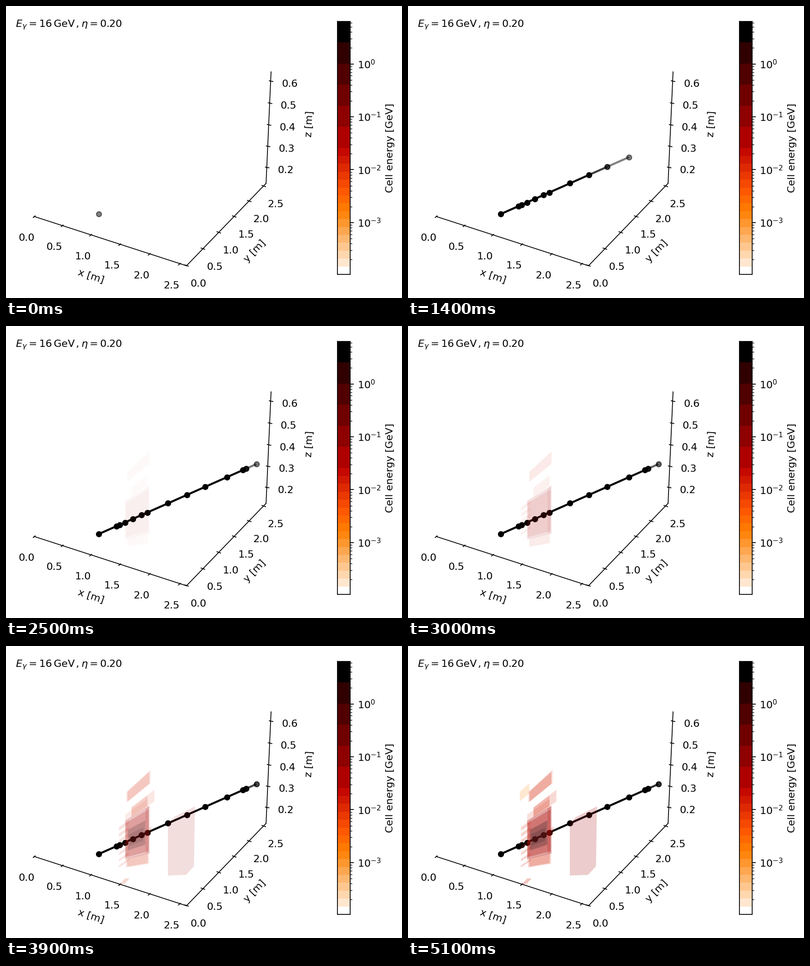
Write a matplotlib script that moves like this. It is 871 px wide and 643 px high and loops after 6.1 s.

```python
import matplotlib.pyplot as plt
import numpy as np
from matplotlib.animation import FuncAnimation
from matplotlib.patches import Polygon

W, H, DPI = 871, 643, 160
FRAMES, INTERVAL = 61, 100
TRACK_END, SHOWER_START, SHOWER_END = 20, 24, 51

plt.rcParams.update({"font.family": "DejaVu Sans", "font.size": 10})
fig = plt.figure(figsize=(W / DPI, H / DPI), dpi=DPI, facecolor="white")
ax = fig.add_axes([0, 0, 1, 1])
ax.set(xlim=(0, W), ylim=(H, 0))
ax.axis("off")


def label(x, y, text, angle):
    ax.text(x, y, text, rotation=angle, ha="center", va="center",
            rotation_mode="anchor")


def axis(start, end, first_tick, last_tick, depth, values, stroke, offset):
    """Axis line whose ticks are spaced in perspective; depth 1 is even spacing."""
    style = dict(color="black", lw=0.8)
    ax.plot(*zip(start, end), **style)
    first_tick, last_tick = np.array(first_tick), np.array(last_tick)
    for u, value in zip(np.linspace(0, 1, len(values)), values):
        x, y = first_tick + (last_tick - first_tick) * u / (u + (1 - u) * depth)
        ax.plot([x - stroke[0], x + stroke[0]], [y - stroke[1], y + stroke[1]], **style)
        ax.text(x + offset[0], y + offset[1], f"{value:.1f}", ha="center", va="baseline")


def draw_axes():
    left, corner, right, top = (62, 463.5), (397, 572), (572, 390.5), (583, 145)
    halves, tenths = np.arange(0, 3, 0.5), np.arange(2, 7) / 10
    axis(left, corner, (62, 464), (381.5, 568.5), 1.049, halves, (2.2, -1.8), (-17, 53))
    axis(corner, right, (397, 571.5), (567, 396.5), 0.93, halves, (4, 1.4), (26.2, 46.7))
    axis(right, top, (574.5, 355.5), (583, 165.5), 1.029, tenths, (4, 0.8), (40.7, 12))
    label(187, 596, "x [m]", -18)
    label(547.5, 540, "y [m]", 46.3)
    label(667.5, 259.5, "z [m]", 87.2)
    ax.text(21, 46, r"$E_\gamma = 16\,\mathrm{GeV}\,, \eta = 0.20$", va="baseline")


def heat(x):
    return tuple(np.clip([1.5 * x, 2 * x - 1, 4 * x - 3], 0, 1))


def draw_colorbar():
    cax = fig.add_axes([729.3 / W, 1 - 591 / H, 28 / W, 557 / H])
    cax.set(yscale="log", ylim=(1.05e-4, 6.35), xlim=(0, 1), xticks=[])
    cax.yaxis.tick_right()
    cax.yaxis.set_minor_formatter("")
    # coarse bands in the dark half, fine bands in the bright half
    edges = np.r_[np.linspace(0, 0.5, 7), np.linspace(0.5, 1, 17)[1:]]
    for i, (a, b) in enumerate(zip(edges[:-1], edges[1:])):
        color = "black" if i == 0 else "white" if b == 1 else heat((a + b) / 2)
        cax.fill_between([0, 1], 1 - b, 1 - a, color=color, lw=0,
                         transform=cax.transAxes, antialiased=False)
    label(845, 312.5, "Cell energy [GeV]", 90)


draw_axes()
draw_colorbar()

# Track: hits on a straight line, each with the segment leading to it.
hit_x = np.array([204.2, 243.3, 250, 261.5, 279, 298, 310.7,
                  356.3, 398, 437.7, 486.3, 521.3, 527.8, 550.5])
hit_y = 458 - 0.4441 * (hit_x - hit_x[0])
hit_births = np.floor(TRACK_END * np.linspace(0, 1, len(hit_x)) ** 1.15).astype(int)


def segment(i):
    part = slice(max(i - 1, 0), i + 1)
    line, = ax.plot(hit_x[part], hit_y[part], "o-", color="black", lw=2, ms=5, mew=1,
                    markevery=[-1], solid_capstyle="butt", zorder=3)
    return line


segments = [segment(i) for i in range(len(hit_x))]

# Shower: translucent cell faces whose edges run towards one horizon.
HORIZON, REACH = 524, 222
FLAME, DEEP, SOOT, PEACH, WINE = [tuple(np.array(c) / 255) for c in (
    (215, 40, 10), (175, 15, 10), (40, 30, 35), (255, 140, 30), (168, 18, 18))]
cells = []


def cell(birth, color, alpha, points):
    patch = ax.add_patch(Polygon(points, fc=color, lw=0, zorder=4))
    cells.append((birth, alpha, patch))


def slab(birth, color, alpha, x0, x1, top, bottom):
    def far(y):
        return y + (y - HORIZON) * (x1 - x0) / REACH
    cell(birth, color, alpha, [(x0, top), (x1, far(top)), (x1, far(bottom)), (x0, bottom)])


def sliver(birth, top, height):
    cell(birth, FLAME, 0.2, [(248.5, top), (270, top - 15),
                             (270, top - 15 + height), (248.5, top + height)])


slab(40, PEACH, 0.2, 246, 267, 321, 342)
slab(24, FLAME, 0.29, 267, 315.5, 321, 343)
slab(31, FLAME, 0.12, 264.5, 318.5, 321, 345)
slab(25, FLAME, 0.2, 276, 311.5, 356, 376)
slab(32, FLAME, 0.17, 276, 326.5, 355, 376)
slab(31, FLAME, 0.14, 262, 311, 371, 386)
slab(24, FLAME, 0.27, 266.5, 312, 468, 486)
slab(31, FLAME, 0.14, 263.5, 315, 470, 488)
slab(28, DEEP, 0.18, 307, 314, 358, 457)
slab(33, FLAME, 0.2, 314, 320.5, 401, 417)

# nested faces, darker towards the shower core
for inset, color, alpha in (0, DEEP, 0.38), (1.5, DEEP, 0.3), (6, SOOT, 0.28), (9, SOOT, 0.2):
    slab(24 + int(1.2 * inset), color, alpha, 262 + inset, 315.5 - 1.5 * inset,
         385 + 3.3 * inset, 470 - 3.3 * inset)

for i in range(7):
    sliver(26 + i, 399 + 14 * i, 8 - 0.5 * i)
cell(32, FLAME, 0.27, [(250, 525), (262, 512), (272, 511.5), (261, 523.5)])
cell(31, WINE, 0.21, [(356, 505.5), (356, 389), (370, 376.5),
                      (415.5, 353), (413.5, 485), (396, 504)])


def update(frame):
    shower_steps = np.clip(frame - SHOWER_START + 1, 0, SHOWER_END - SHOWER_START + 1)
    for birth, line in zip(hit_births, segments):
        line.set_visible(frame >= birth)
        paints = max(min(frame, TRACK_END) - birth + 1, 0)
        line.set_alpha(float(1 - 0.5 ** paints * 0.965 ** shower_steps))
    glow = np.interp(frame, [23, 30, 34, 44, 51], [0, 0.32, 0.5, 0.8, 1])
    for birth, alpha, patch in cells:
        patch.set_visible(frame >= birth)
        patch.set_alpha(alpha * glow)
    return []


anim = FuncAnimation(fig, update, frames=FRAMES, init_func=lambda: update(0),
                     interval=INTERVAL, repeat=True, repeat_delay=0, blit=False)
plt.show()
```
